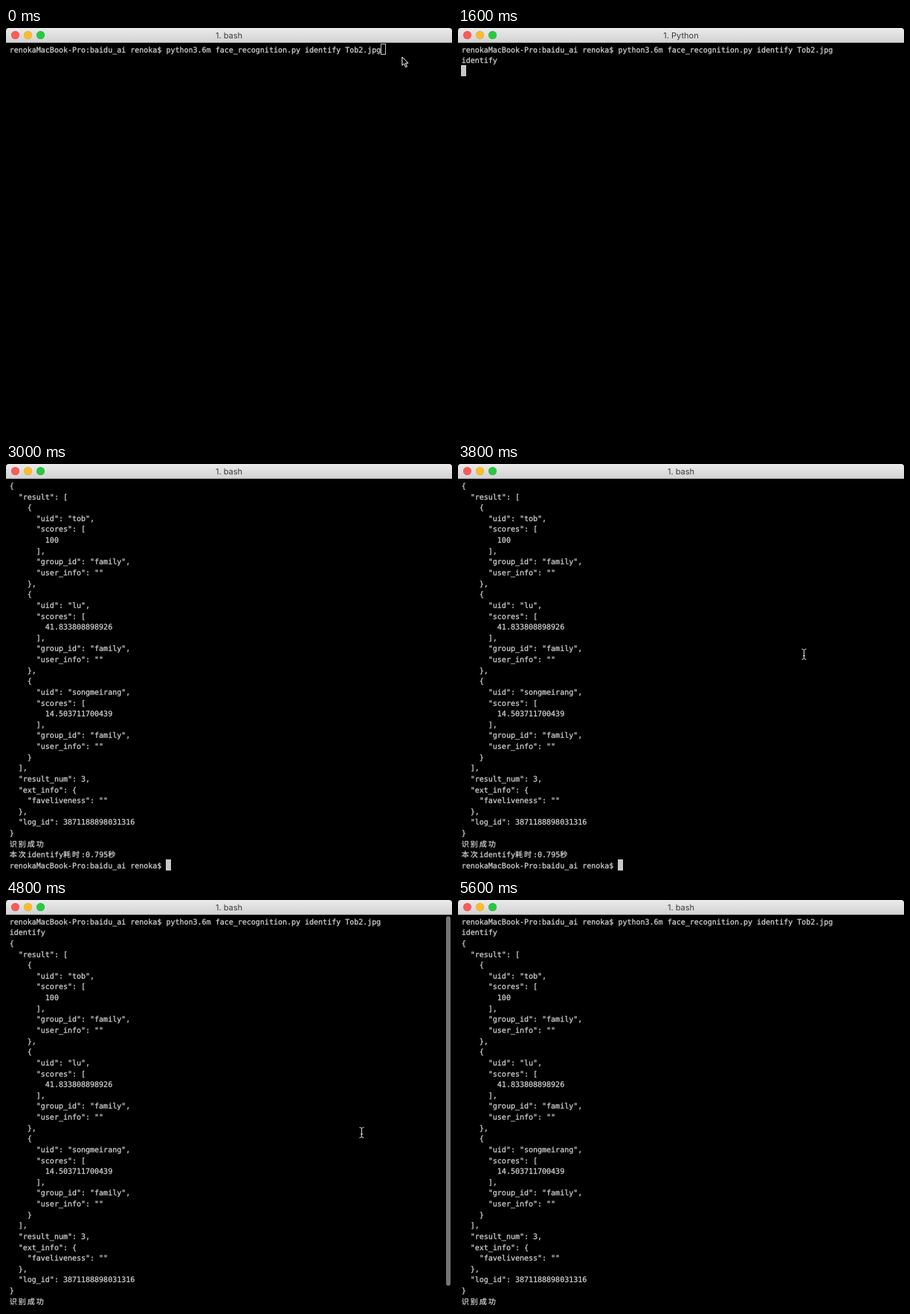
These frames come from a looping animation (600x550 px, 6000 ms). An HTML page:

```html
<!DOCTYPE html>
<html lang="en">
<head>
<meta charset="utf-8">
<title>Terminal</title>
<style>
  :root { --col: 6.02px; --row: 14.63px; }
  html, body {
    margin: 0; width: 100%; height: 100%; overflow: hidden; background: #000;
  }
  #stage { position: relative; width: 600px; height: 550px; overflow: hidden; background: #000; }
  #stage * { position: absolute; box-sizing: border-box; }
  .anim { animation: 6s step-end infinite; }

  #bar {
    left: 0; top: 0; width: 600px; height: 20px;
    background: linear-gradient(#ebebeb, #d3d3d3);
    border-bottom: 1px solid #b4b4b4; border-radius: 4px 4px 0 0;
  }
  .light {
    top: 4px; width: 11px; height: 11px; border-radius: 50%;
    box-shadow: inset 0 0 0 .5px rgba(0, 0, 0, .12);
  }
  .title {
    left: 0; width: 600px; top: 0; text-align: center;
    font: 11px/20px Inter, Roboto, sans-serif; color: #3c3c3c;
    text-rendering: geometricPrecision;
  }

  #screen { left: 4px; top: 21px; width: 590px; height: calc(36 * var(--row) + 1px); overflow: hidden; }
  #text { left: 0; top: 0; width: 590px; animation-name: scroll; }
  .line {
    left: .7px; height: var(--row); margin-top: 2.7px; white-space: pre; color: #d2d2d2;
    font: 10px/var(--row) "DejaVu Sans Mono", monospace;
    -webkit-text-stroke: .25px #d2d2d2;
    text-rendering: geometricPrecision; font-variant-ligatures: none;
  }
  #stage .wide {
    position: static; font: 10px/0 "Noto Sans CJK SC", "Noto Sans CJK JP", sans-serif;
    letter-spacing: 2.04px;
  }
  #cursor {
    width: 7px; height: 15px; margin: .2px; border: 1px solid #c7c7c7;
    animation-name: cursor;
  }

  #reply { animation-name: reply; }
  #output { animation-name: output; }
  #bash { animation-name: bash; }
  #python { animation-name: python; }
  #arrow { left: 530px; top: 36px; animation-name: arrow; }
  #beam { animation-name: beam; }
  #thumb {
    left: 592px; top: 22px; width: 6px; height: 498px; border-radius: 3px;
    background: #757575; animation-name: thumb;
  }

  @keyframes scroll {
    0%, 80% { top: 0; }
    36.667% { top: calc(-2 * var(--row)); }
    100% { top: 0; }
  }
  @keyframes cursor {
    0% { left: calc(83 * var(--col)); top: 0; background: transparent; }
    13.333% { left: calc(83 * var(--col)); top: 0; background: #c7c7c7; }
    16.667% { left: 0; top: var(--row); background: #c7c7c7; }
    23.333% { left: 0; top: calc(2 * var(--row)); background: #c7c7c7; }
    36.667%, 100% { left: calc(35 * var(--col)); top: calc(37 * var(--row)); background: #c7c7c7; }
  }
  @keyframes reply { 0% { opacity: 0; } 23.333%, 100% { opacity: 1; } }
  @keyframes output { 0% { opacity: 0; } 36.667%, 100% { opacity: 1; } }
  @keyframes bash { 0% { opacity: 1; } 26.667% { opacity: 0; } 46.667%, 100% { opacity: 1; } }
  @keyframes python { 0% { opacity: 0; } 26.667% { opacity: 1; } 46.667%, 100% { opacity: 0; } }
  @keyframes arrow { 0% { opacity: 1; } 13.333%, 100% { opacity: 0; } }
  @keyframes beam {
    0% { left: 529px; top: 32px; opacity: 0; }
    13.333% { left: 529px; top: 32px; opacity: 1; }
    16.667% { left: 529px; top: 32px; opacity: 0; }
    56.667% { left: 496px; top: 141px; opacity: 1; }
    60% { left: 462px; top: 249px; opacity: 1; }
    66.667% { left: 475px; top: 305px; opacity: 1; }
    70% { left: 475px; top: 306px; opacity: 1; }
    90%, 100% { left: 475px; top: 306px; opacity: 0; }
  }
  @keyframes thumb { 0% { opacity: 0; } 80% { opacity: 1; } 86.667%, 100% { opacity: 0; } }
</style>
</head>
<body>
<div id="stage">
  <div id="bar">
    <div class="light" style="left:7px;background:#fc5b57"></div>
    <div class="light" style="left:24px;background:#fdbc2e"></div>
    <div class="light" style="left:41px;background:#28c840"></div>
    <div id="bash" class="title anim">1. bash</div>
    <div id="python" class="title anim">1. Python</div>
  </div>
  <div id="screen">
    <div id="text" class="anim">
      <div id="command"></div>
      <div id="reply" class="anim"></div>
      <div id="output" class="anim"></div>
      <div id="cursor" class="anim"></div>
    </div>
  </div>
  <div id="thumb" class="anim"></div>
  <svg id="arrow" class="anim" width="14" height="20">
    <path d="M2.9 3V14.4L5.6 12L7.6 16.8L9.5 16L7.5 11.3H11Z" fill="#000" stroke="#fff" stroke-linejoin="round"/>
  </svg>
  <svg id="beam" class="anim" width="7" height="15">
    <path d="M.5 .5Q3.5 .5 3.5 2.5Q3.5 .5 6.5 .5M3.5 2V13M.5 14.5Q3.5 14.5 3.5 12.5Q3.5 14.5 6.5 14.5M2 9.5H5" fill="none" stroke="#dcdcdc"/>
  </svg>
</div>
<script>
  const prompt = "renokaMacBook-Pro:baidu_ai renoka$ ";
  const user = (uid, score) => ({ uid, scores: [score], group_id: "family", user_info: "" });
  const response = {
    result: [user("tob", 100), user("lu", 41.833808898926), user("songmeirang", 14.503711700439)],
    result_num: 3,
    ext_info: { faveliveness: "" },
    log_id: 3871188898031316
  };

  // Adds lines to a block, starting at the given terminal row.
  function print(id, row, lines) {
    const block = document.getElementById(id);
    lines.forEach((text, i) => {
      const line = document.createElement("div");
      line.className = "line";
      line.style.top = `calc(${row + i} * var(--row))`;
      line.innerHTML = text.replace(/[\u4e00-\u9fff]+/g, '<span class="wide">$&</span>');
      block.append(line);
    });
  }

  print("command", 0, [prompt + "python3.6m face_recognition.py identify Tob2.jpg"]);
  print("reply", 1, ["identify"]);
  print("output", 2, [
    ...JSON.stringify(response, null, 2).split("\n"),
    "识别成功",
    "本次identify耗时:0.795秒",
    prompt
  ]);
</script>
</body>
</html>
```
